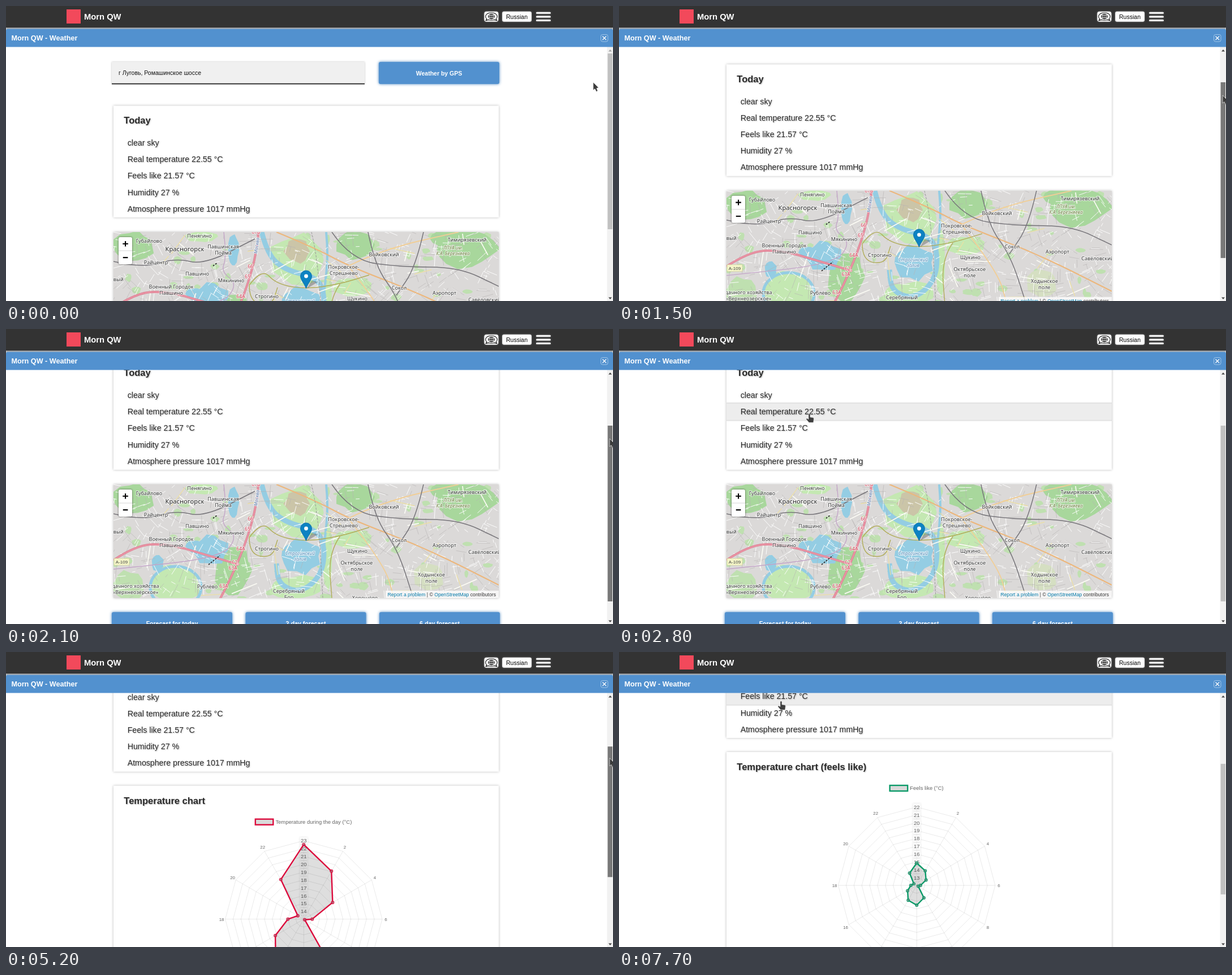
An HTML page for the animation above (8000 ms loop, 1073x522 px).

```html
<!DOCTYPE html>
<html lang="en">
<head>
<meta charset="utf-8">
<title>Weather</title>
<style>
html,body{margin:0;width:100%;height:100%;overflow:hidden;background:#fff}
svg{display:block;position:absolute;left:0;top:0;font-family:"Liberation Sans",Arial,sans-serif}
text{white-space:pre}
.card{fill:#fff;filter:drop-shadow(0 0 2px rgba(0,0,0,.28))}
.btn{fill:#5291cf;filter:drop-shadow(0 0 2.5px rgba(40,110,180,.85))}
.soft{fill:#2b2b2b;text-shadow:1px 1px 2px rgba(0,0,0,.28)}
.b{font-weight:bold}
.i{font-style:italic}
.mid{text-anchor:middle}
.map text{font-family:"Noto Sans",sans-serif;paint-order:stroke;stroke:#fff;stroke-opacity:.75;stroke-width:2px;stroke-linejoin:round}
.map .plain{font-family:"Liberation Sans",Arial,sans-serif;stroke:none}
</style>
</head>
<body>
<svg id="stage" width="1073" height="522" viewBox="0 0 1073 522"></svg>
<script>
const BLUE = '#5291cf', WATER = '#94cde3', FOREST = '#a8d79c', MEADOW = '#c4e8b2';
const LEFT = 190, WIDTH = 681, ROW = 29.1, ROW0 = 242.1;
const MAP_Y = 400, MAP_H = 201;

// cy is the middle of the capitals
function label(x, cy, size, str, attrs = '') {
  return `<text x="${x}" y="${(cy + size * .36).toFixed(2)}" font-size="${size}" ${attrs}>${str}</text>`;
}
function rect(x, y, w, h, attrs = '') {
  return `<rect x="${x}" y="${y}" width="${w}" height="${h}" ${attrs}/>`;
}
function path(d, attrs) {
  return `<path d="${d}" ${attrs}/>`;
}
function line(d, color, width, extra = '') {
  return path(d, `fill="none" stroke="${color}" stroke-width="${width}" stroke-linejoin="round" ${extra}`);
}
function random(seed) {
  return () => (seed = (seed * 16807) % 2147483647) / 2147483647;
}
const rnd = random(4711);
const xy = (x, y) => x.toFixed(1) + ' ' + y.toFixed(1);
const range = n => Array.from({length: n}, (_, i) => i);

// Smooth path through a few points
function curve(...p) {
  let d = `M${p[0]} ${p[1]}`;
  for (let i = 2; i < p.length - 2; i += 2) {
    d += `Q${p[i]} ${p[i + 1]} ${xy((p[i] + p[i + 2]) / 2, (p[i + 1] + p[i + 3]) / 2)}`;
  }
  return d + `L${p[p.length - 2]} ${p[p.length - 1]}`;
}
// Uneven round area
function blob(x, y, rx, ry, color) {
  const pts = range(14).map(i => {
    const a = i * Math.PI / 7, k = .85 + rnd() * .3;
    return xy(x + rx * k * Math.cos(a), y + ry * k * Math.sin(a));
  });
  return path('M' + pts.join('L') + 'Z', `fill="${color}"`);
}

// Map parts are placed with y from 0 to MAP_H
const randomX = () => LEFT + rnd() * WIDTH, randomY = () => rnd() * MAP_H;

function streets(count, min, max) {
  return range(count).map(() => {
    const x = randomX(), y = randomY(), len = min + rnd() * (max - min);
    const a = Math.sin(x / 90) + Math.cos(y / 60) + (rnd() < .5 ? 0 : Math.PI / 2);
    return `M${xy(x, y)}l${xy(Math.cos(a) * len, Math.sin(a) * len)}`;
  }).join('');
}
const ringX = y => 442 - 56 * (Math.max(0, y) / 180) ** 1.6;

function land() {
  return range(80).map(() => blob(randomX(), randomY(), 3 + rnd() * 8, 2 + rnd() * 6, '#bfe0b0')).join('') +
    blob(225, 25, 36, 26, FOREST) + blob(345, 8, 28, 9, MEADOW) + blob(215, 180, 28, 26, '#bfe0b0') +
    blob(619, 22, 34, 25, FOREST) + blob(812, 30, 55, 34, FOREST) + blob(790, 12, 38, 16, FOREST) +
    blob(515, 50, 48, 46, MEADOW) + blob(515, 34, 22, 20, '#cbc5a8') +
    blob(402, 152, 33, 40, FOREST) + blob(515, 182, 48, 20, MEADOW) + blob(612, 98, 34, 16, MEADOW) +
    blob(568, 130, 9, 60, MEADOW) + blob(748, 165, 26, 26, '#d5dfc2') + blob(300, 178, 44, 36, MEADOW);
}
function waters() {
  return line(curve(452, 0, 462, 40, 495, 68, 550, 80, 564, 112, 558, 160, 522, 192, 482, 178, 478, 140), WATER, 9) +
    line(curve(566, 0, 570, 40, 562, 110), WATER, 4) +
    blob(521, 127, 36, 32, WATER) + blob(362, 117, 30, 27, WATER) + blob(335, 110, 16, 11, WATER) +
    blob(402, 32, 9, 26, WATER) + blob(268, 140, 11, 14, WATER) +
    `<ellipse cx="300" cy="182" rx="45" ry="37" fill="none" stroke="${WATER}" stroke-width="5"/>`;
}
function roads() {
  const ring = 'M' + range(12).map(i => xy(ringX(i * 19 - 6) + 4, i * 19 - 6)).join('L');
  const highway = curve(190, 134, 232, 106, 290, 106, 345, 122, 412, 142);
  const rails = [
    curve(190, 52, 240, 64, 300, 46, 350, 58, 440, 12),
    curve(576, 0, 610, 50, 700, 62, 800, 62, 871, 96),
    curve(640, 0, 652, 60, 692, 114, 720, 201),
    curve(738, 0, 724, 62, 690, 112)
  ].join('');
  const yellow = [
    curve(430, 94, 452, 64, 478, 92, 530, 101, 590, 92, 642, 76),
    curve(430, 94, 430, 124, 470, 130, 480, 98),
    curve(590, 92, 570, 122, 576, 201)
  ].join('');
  return line(streets(460, 5, 24), '#fff', .9) + line(streets(320, 6, 28), '#b5b2b2', .6) +
    line(streets(26, 18, 50), '#fbfbf4', 1.7) + line(streets(14, 15, 45), '#eee0a0', 1.2) +
    line(curve(385, 0, 390, 45, 380, 70, 410, 92, 380, 130, 190, 150), '#c3a5c8', 1.4) +
    line(curve(478, 0, 550, 30, 605, 60, 740, 112, 871, 178), '#ecb77d', 2.2) +
    line(curve(605, 60, 668, 30, 800, 0) + curve(605, 60, 668, 140, 686, 201), '#f1ce96', 1.8) +
    line(yellow, '#b0ad58', 1.4) + line(rails, '#77757a', 1.5) +
    line(curve(540, 0, 552, 50, 560, 201), '#9a9a9a', 1, 'stroke-dasharray="4 2"') +
    line(ring + highway, '#d9778a', 3.8) + line(ring + highway, '#e994a5', 2.4) +
    line('M358 142l20-16M366 60l8-6', '#333', 1.8, 'stroke-dasharray="3 2"');
}
function mapLabels() {
  const places = [
    [253, 16, 'Губайлово'], [342, 7, 'Пенягино'], [265, 54, 'Райцентр'], [384, 26, 'Павшинская|Пойма'],
    [338, 74, 'Павшино'], [398, 86, 'Мякинино'], [196, 84, 'овый'], [292, 97, 'Военный Городок|Павшино'],
    [229, 180, 'дачного хозяйства|«Верхнеозёрское»'], [356, 181, 'Рублёво'], [461, 114, 'Строгино'],
    [500, 189, 'Серебряный|Бор'], [597, 62, 'Покровское-|Стрешнево'], [668, 40, 'Войковский'],
    [815, 14, 'Тимирязевский'], [695, 99, 'Сокол'], [775, 108, 'Аэропорт'], [846, 120, 'Савёловский'],
    [621, 118, 'Щукино'], [620, 139, 'Октябрьское|поле'], [752, 160, 'Ходынское|поле'], [636, 201, 'Хорошёво-']
  ];
  const put = (x, y, size, str, color, cls = '') => str.split('|')
    .map((s, i) => label(x, y + i * size * 1.22, size, s, `class="mid ${cls}" fill="${color}"`)).join('');
  const exits = {'67В': 0, '66': 61, '65': 79, '64А': 114, '62,': 138, '63А': 148, '63А ': 180};
  return places.map(([x, y, str]) => put(x, y, 9, str, '#333')).join('') +
    Object.entries(exits).map(([str, y]) => put(ringX(y), y, 8.6, str, '#d0324b')).join('') +
    put(316, 30, 11.2, 'Красногорск', '#222') +
    put(790, 28, 8.2, 'ЛПУА им.|К.А. Березняева', '#6b7a3c', 'i') +
    put(520, 122, 8.2, 'Строгинский|залив', '#4f86b5', 'i') +
    `<g transform="rotate(-82 443 24)">${put(443, 24, 8.4, 'Москва', '#4f86b5', 'i')}</g>` +
    rect(191, 131, 27, 12, 'fill="#f4f5c8" stroke="#c8c890" stroke-width=".6"') +
    put(204.5, 137, 8, 'А-109', '#444', 'plain');
}
function mapControls() {
  const pin = path('M532 100l8-14 12 2z', 'fill="#000" opacity=".25"') +
    path('M530.5 100C527 90 520.5 85 520.5 78a10 10 0 0 1 20 0C540.5 85 534 90 530.5 100Z', 'fill="#0d82c2" stroke="#0a6ba2" stroke-width=".8"') +
    '<circle cx="530.5" cy="78" r="3.4" fill="#fff"/>';
  const zoom = rect(199, 9, 24, 48, 'rx="3" fill="#fff" style="filter:drop-shadow(0 0 1.5px rgba(0,0,0,.6))"') +
    line('M199 33h24', '#ccc', .8) + line('M206.3 20.8h9.6M211.1 16v9.6M206.8 45.1h8.6', '#000', 2.1);
  const credit = rect(671, 188, 200, 13, 'fill="#fff" fill-opacity=".75"') +
    label(674.5, 194.6, 8.66, '<tspan fill="#0078a8">Report a problem</tspan> | © <tspan fill="#0078a8">OpenStreetMap</tspan> contributors', 'class="plain" fill="#333"');
  return pin + zoom + credit;
}
function cityMap() {
  return `<g class="map" transform="translate(0 ${MAP_Y})">` + rect(LEFT, 0, WIDTH, MAP_H, 'class="card"') +
    '<g clip-path="url(#mapClip)">' + rect(LEFT, 0, WIDTH, MAP_H, 'fill="#dbd9d8"') +
    land() + waters() + roads() + mapLabels() + mapControls() + '</g></g>';
}

function radar(color, title, legend, legendX, max, radii) {
  const cx = 526.3, cy = 635, step = 13.87, edge = 10 * step;
  const at = (i, r) => xy(cx + r * Math.sin(i * Math.PI / 6), cy - r * Math.cos(i * Math.PI / 6));
  const poly = f => 'M' + range(12).map(i => at(i, f(i))).join('L') + 'Z';
  const grid = range(10).map(k => poly(() => (k + 1) * step)).join('') +
    range(12).map(i => `M${cx} ${cy}L${at(i, edge)}`).join('');
  const ticks = range(10).map(k => {
    const y = cy - (k + 1) * step;
    return rect(cx - 6.8, y - 6.3, 13.6, 12.6, 'fill="#fff" fill-opacity=".8" style="filter:drop-shadow(0 0 1.5px rgba(0,0,0,.16))"') +
      label(cx, y, 9.6, max - 9 + k, 'class="mid" fill="#666"');
  }).join('');
  const hours = range(12).slice(1).map(i => {
    const a = i * Math.PI / 6;
    return label(cx + (edge + 6.5) * Math.sin(a), cy - (edge + 9) * Math.cos(a), 7.87, i * 2, 'class="mid" fill="#666"');
  }).join('');
  const dots = radii.map((r, i) => {
    const [x, y] = at(i, r).split(' ');
    return `<circle cx="${x}" cy="${y}" r="2.4" fill="#888" fill-opacity=".5" stroke="${color}" stroke-width="1.1"/>`;
  }).join('');
  return rect(LEFT, 399, WIDTH, 426, 'class="card"') +
    label(208.3, 425, 16.5, title, 'class="b soft"') +
    rect(legendX, 458, 31.5, 10, `fill="#dadada" stroke="${color}" stroke-width="2.4"`) +
    label(legendX + 35.6, 463, 9.45, legend, 'fill="#666"') +
    line(grid, '#000', .8, 'stroke-opacity=".11"') + ticks + hours +
    path(poly(i => radii[i]), `fill="#000" fill-opacity=".13" stroke="${color}" stroke-width="2.4" stroke-linejoin="round"`) + dots;
}

function header() {
  const bars = range(3).map(i => rect(937, 10.8 + i * 6.6, 26, 3, 'rx="1.5" fill="#fff"')).join('');
  const globe = line('M852.6 18.6h10.8M858 14.4v8.4', '#111', .9) +
    '<g fill="none" stroke="#111"><ellipse cx="858" cy="18.6" rx="5.4" ry="4.2"/><ellipse cx="858" cy="18.6" rx="2.2" ry="4.2"/></g>';
  const bubble = line('M850 23l-2 2.6 5-1.2q5 1.6 10 0l5 1.2-2-2.6q3-2.6 2-6-2-5-10-5t-10 5q-1 3.400 2 6z', '#111', 1.1);
  return rect(0, 38, 1073, 6, 'fill="#c4c8cc"') +
    rect(0, 0, 1073, 38, 'fill="#333" style="filter:drop-shadow(0 1px 1px rgba(0,0,0,.45))"') +
    path('M0 72.4V44q0-3.500 3-3.500H1070q3 0 3 3.500V72.4Z', `fill="${BLUE}"`) +
    rect(107, 6, 25, 25, 'fill="#f2495b"') +
    label(138, 18.6, 14.75, 'Morn QW', 'class="b" fill="#fff"') +
    label(9.4, 56.4, 12.65, 'Morn QW - Weather', 'class="b" fill="#fff"') +
    '<g style="filter:drop-shadow(0 0 1.5px rgba(255,255,255,.35))">' +
    rect(845.4, 9.8, 25, 18, 'rx="4" fill="#fff"') + rect(877.2, 9.8, 51.8, 18, 'rx="3" fill="#fff"') + bars + '</g>' +
    bubble + globe + label(903, 19.2, 10.5, 'Russian', 'class="mid"') +
    rect(1051.5, 50.5, 12.5, 12.5, 'rx="3" fill="none" stroke="#a9cbea" stroke-width=".9"') +
    line('M1054.5 53.5l6.5 6.5m0-6.5l-6.5 6.5', '#fff', 1.3);
}

function button(x, y, str) {
  return rect(x, y, 213, 39, 'rx="3" class="btn"') + label(x + 106.5, y + 20.3, 10.5, str, 'class="b mid" fill="#fff"');
}
function pageTop() {
  const rows = ['clear sky', 'Real temperature 22.55 °C', 'Feels like 21.57 °C', 'Humidity 27 %', 'Atmosphere pressure 1017 mmHg'];
  return rect(187, 99, 447, 39, 'fill="#f0f0f0" style="filter:drop-shadow(0 0 1.5px rgba(0,0,0,.25))"') +
    rect(187, 136.8, 447, 1.7, 'fill="#222"') +
    label(199, 118.5, 10.5, 'г Луговь, Ромашинское шоссе', 'fill="#111"') +
    button(659, 99, 'Weather by GPS') +
    rect(LEFT, 176.5, WIDTH, 197.5, 'class="card"') +
    label(208.3, 202, 16.5, 'Today', 'class="b soft"') +
    '<g clip-path="url(#cardClip)">' +
    rect(LEFT - 5, 0, WIDTH + 10, 29.6, 'id="hover" fill="#ededed" style="filter:drop-shadow(0 0 1.5px rgba(0,0,0,.35))"') + '</g>' +
    rows.map((r, i) => label(214.7, ROW0 + i * ROW, 14.18, r, 'class="soft"')).join('');
}

const day = [132, 98, 59, 15, 2, 82, 116, 99, 58, 28, 12, 81];
const clip = (id, ...box) => `<clipPath id="${id}">${rect(...box)}</clipPath>`;

stage.innerHTML =
  '<defs>' + clip('view', 0, 72, 1063, 450) + clip('mapClip', LEFT, 0, WIDTH, MAP_H) + clip('cardClip', LEFT, 176, WIDTH, 198) + '</defs>' +
  '<g clip-path="url(#view)"><g id="page">' + pageTop() +
  '<g id="mapBox">' + cityMap() +
  ['Forecast for today', '2-day forecast', '6-day forecast'].map((s, i) => button(187 + i * 236.5, 626, s)).join('') + '</g>' +
  '<g id="dayBox">' + radar('#dc0a3c', 'Temperature chart', 'Temperature during the day (°C)', 440.8, 23, day) + '</g>' +
  '<g id="feelsBox">' + radar('#0a9a68', 'Temperature chart (feels like)', 'Feels like (°C)', 478.7, 22, day.map(r => r * .28 + 2.5)) + '</g>' +
  '</g></g>' +
  rect(1062.5, 72, 10.5, 450, 'fill="#f1f1f1"') + rect(1063.6, 84, 8.4, 311, 'id="thumb"') +
  path('M1065 80.500h6l-3-3.500z', 'id="upArrow"') + path('M1065 515.500h6l-3 3.500z', 'fill="#444"') +
  header() +
  path('M0 0v14l3-2.4 2.5 4.900 2.500-1.200-2-4.700 3.500-1z', 'id="arrow" fill="#3b3b3b" stroke="#eee" stroke-width=".7"') +
  path('M0 .8q1.500-1.800 3 0V6l5 .8q1.600.5 1.400 2.200l-.8 6.500H.8L-4 9.800q-.2-1.800 1.600-1.500L0 9.800z', 'id="hand" fill="#3f3f3f" stroke="#eee" stroke-width=".5"');

const el = id => document.getElementById(id);
const show = (id, on) => el(id).setAttribute('display', on ? 'inline' : 'none');
const mix = (a, b, k) => a + (b - a) * k;

// Progress from start to end, slowing down by power p
function ease(t, start, end, p) {
  const k = Math.min(1, Math.max(0, (t - start) / (end - start)));
  return 1 - (1 - k) ** p;
}
// Value of the last key [time, value] reached
function hold(keys, t) {
  return keys.reduce((v, key) => t >= key[0] ? key[1] : v, keys[0][1]);
}

function scrollAt(t) {
  if (t < 4900) return 125 * ease(t, 900, 2100, 1.27);
  const moved = [4900, 5200, 5400, 5600, 6000].filter(m => m <= t).pop();
  return mix(125, 222, ease(moved, 4700, 6000, 1));
}
function cursorAt(t, top) {
  if (t < 600) return t < 100 ? [1038, 135] : [1058, 122];
  if (t < 2300) return [1067, top + 23];
  if (t < 4400) {
    const k = ease(t, 2200, 2800, 2);
    return [mix(1067, 335, k), mix(194, 150, k)];
  }
  if (t < 6800) return [1067, top + 20.4];
  return t < 7100 ? [300, 104] : [285, 87];
}
function thumbColor(t) {
  const idle = '#c1c1c1', near = '#a8a8a8', held = '#787878';
  return hold([[0, idle], [600, near], [1000, held], [2300, near], [2400, idle], [4400, near], [4900, held], [6800, idle]], t);
}

function draw(time) {
  const t = Math.floor(time / 100) * 100;
  const chart = t >= 4400, like = t >= 7700;
  const scroll = scrollAt(t), top = 84 + scroll * (chart ? .513 : .696);
  const [x, y] = cursorAt(t, top);
  const row = Math.floor((y + scroll - ROW0 + ROW / 2) / ROW);
  const over = x > LEFT && x < LEFT + WIDTH && row >= 0 && row < 5;

  el('page').setAttribute('transform', `translate(0 ${-scroll})`);
  show('mapBox', !chart);
  show('dayBox', chart && !like);
  show('feelsBox', like);
  show('hover', over);
  el('hover').setAttribute('y', ROW0 + row * ROW - 14.6);

  el('thumb').setAttribute('y', top);
  el('thumb').setAttribute('height', chart ? 231 : 311);
  el('thumb').setAttribute('fill', thumbColor(t));
  el('upArrow').setAttribute('fill', scroll ? '#444' : '#a3a3a3');

  for (const id of ['arrow', 'hand']) el(id).setAttribute('transform', `translate(${x} ${y})`);
  show('arrow', !over);
  show('hand', over);
}

const start = performance.now();
function tick(now) {
  draw(Math.max(0, now - start) % 8000);
  requestAnimationFrame(tick);
}
draw(0);
requestAnimationFrame(tick);
</script>
</body>
</html>
```
